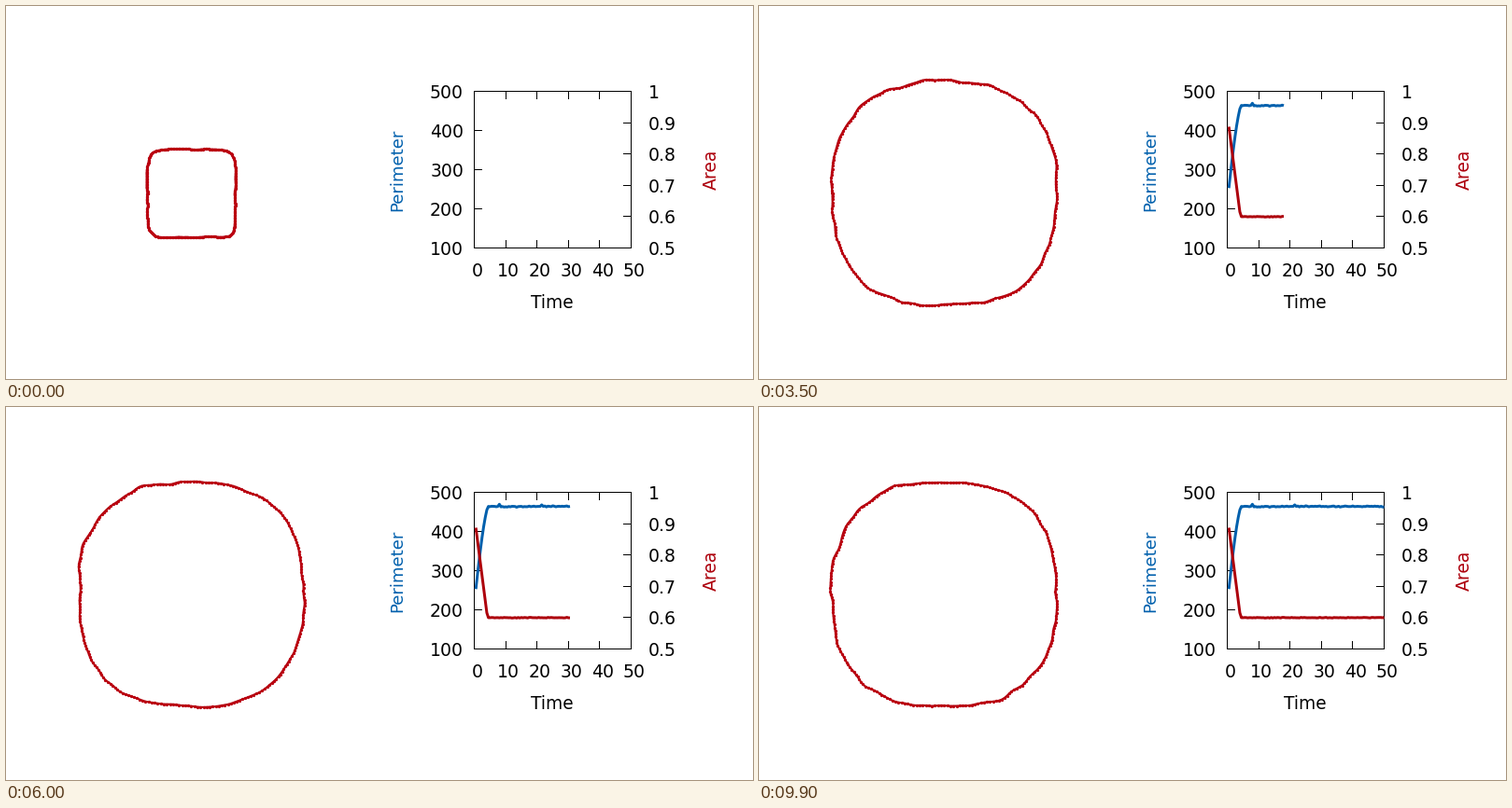
A matplotlib script for the animation above (10000 ms loop, 800x400 px).

```python
import numpy as np
import matplotlib.pyplot as plt
from matplotlib.animation import FuncAnimation

W, H, DPI = 800, 400, 100
FRAMES, STEP_MS = 100, 100
BLUE, RED, BEAD = "#0060ad", "#ad000c", "#ba0010"
LEFT, RIGHT, TOP, BOTTOM = 501.5, 669.5, 91.5, 259.5
CX, CY = 198.3, 200.8
BEADS = 240

plt.rcParams["font.family"] = "DejaVu Sans"
rng = np.random.default_rng(7)


def px(n):
    """Pixels to points."""
    return n * 72 / DPI


# --- time series --------------------------------------------------------
k = np.arange(FRAMES)
time = 0.5 * (k + 1)
rise = np.minimum(k / 7.6, 1)
growth = (rise + np.sin(np.pi / 2 * rise)) / 2
settled = k > 8
perimeter = 253 + 211 * growth + settled * rng.normal(0, 0.8, FRAMES)
perimeter[[15, 42]] += 5  # brief stretches
area = 0.887 - 0.287 * np.minimum(k / 7.4, 1)
area += settled * rng.normal(0, 0.0006, FRAMES)

# --- membrane outline ---------------------------------------------------
theta = np.linspace(-np.pi, np.pi, 721)


def superellipse(half, power):
    c, s = np.abs(np.cos(theta)), np.abs(np.sin(theta))
    return half / (c ** power + s ** power) ** (1 / power)


def make_ripple(std=0.0075, span=15):
    """Relative radial waves, weaker when short, drifting smoothly."""
    modes = np.arange(5, 45)
    shape = (FRAMES + span - 1, modes.size)
    amp = (rng.normal(size=shape) + 1j * rng.normal(size=shape)) / modes
    kernel = np.hanning(span + 2)[1:-1]
    amp = np.array([np.convolve(a, kernel, "valid") for a in amp.T]).T
    wave = (amp @ np.exp(1j * np.outer(modes, theta))).real
    return wave * std / wave.std()


START, SWOLLEN = superellipse(47.2, 7), superellipse(120.2, 2.5)
RIPPLE = make_ripple()


def outline(n):
    """Evenly spaced beads along the closed membrane."""
    r = (START + growth[n] * (SWOLLEN - START)) * (1 + RIPPLE[n])
    x, y = CX + r * np.cos(theta), CY + r * np.sin(theta)
    arc = np.append(0, np.cumsum(np.hypot(np.diff(x), np.diff(y))))
    s = np.linspace(0, arc[-1], BEADS + 1)
    return np.interp(s, arc, x), np.interp(s, arc, y)


# --- stage --------------------------------------------------------------
fig = plt.figure(figsize=(W / DPI, H / DPI), dpi=DPI, facecolor="white")
ax = fig.add_axes([0, 0, 1, 1])
ax.set(xlim=(0, W), ylim=(H, 0))
ax.axis("off")


def to_x(t):
    return LEFT + t / 50 * (RIGHT - LEFT)


def to_y(v, lo, hi):
    return BOTTOM - (v - lo) / (hi - lo) * (BOTTOM - TOP)


def mid(v):
    """Centre of the pixel that holds v."""
    return np.floor(v + 1e-6) + 0.5


def stroke(x, y):
    ax.plot(x, y, color="black", lw=px(1), solid_capstyle="projecting",
            solid_joinstyle="miter", snap=False, zorder=3)


def label(x, y, text, size=18.9, **kw):
    ax.text(x, y, text, fontsize=px(size), va="baseline", **kw)


stroke([LEFT, RIGHT, RIGHT, LEFT, LEFT], [TOP, TOP, BOTTOM, BOTTOM, TOP])
for t in range(0, 51, 10):
    x = to_x(t)
    label(x + 3.2, 290.5, str(t), ha="center")
    if 0 < t < 50:
        stroke([mid(x)] * 2, [TOP, TOP + 8])
        stroke([mid(x)] * 2, [BOTTOM, BOTTOM - 8])
for v in range(100, 501, 100):
    y = to_y(v, 100, 500)
    label(490, y + 7.5, str(v), ha="right")
    stroke([LEFT, LEFT + 8], [mid(y)] * 2)
for v in np.arange(5, 11) / 10:
    y = to_y(v, 0.5, 1)
    label(687.5, y + 7.5, f"{v:g}", ha="left")
    stroke([RIGHT, RIGHT - 8], [mid(y)] * 2)

label(585, 324, "Time", 18.67, ha="center")
upright = dict(rotation=90, rotation_mode="anchor", ha="center")
label(424, 175.5, "Perimeter", 18.1, color=BLUE, **upright)
label(760.5, 175, "Area", 18.8, color=RED, **upright)

curve = dict(lw=px(3), solid_capstyle="butt", solid_joinstyle="round",
             zorder=4)
p_line, = ax.plot([], [], color=BLUE, **curve)
a_line, = ax.plot([], [], color=RED, **curve)
membrane, = ax.plot([], [], color=RED, lw=px(2.1), marker="o",
                    markersize=px(3.3), markerfacecolor=BEAD,
                    markeredgewidth=0)


def draw(n):
    shown = slice(0, n + 1)
    x = to_x(time[shown])
    p_line.set_data(x, to_y(perimeter[shown], 100, 500))
    a_line.set_data(x, to_y(area[shown], 0.5, 1))
    membrane.set_data(*outline(n))
    return p_line, a_line, membrane


anim = FuncAnimation(fig, draw, frames=FRAMES, interval=STEP_MS,
                     repeat=True, repeat_delay=0)
plt.show()
```
